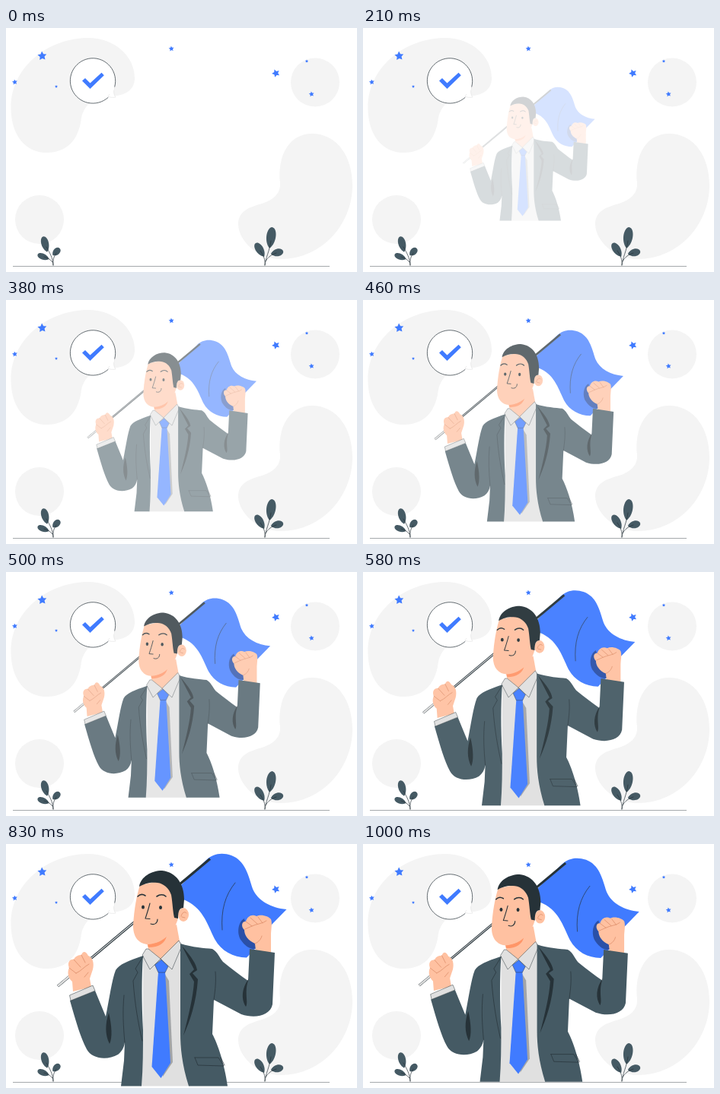
Recreate the animation shown at these times as an HTML page. Size 461x321 px, loop 1.04 s.

```html
<!DOCTYPE html>
<html lang="en">
<head>
<meta charset="utf-8">
<title>Success</title>
<style>
  html, body { margin: 0; width: 100%; height: 100%; overflow: hidden; background: #fff; }
  svg { display: block; width: 461px; height: 321px; }
  .soft { fill: #f4f4f4; }
  .blue { fill: #407bff; }
  .skin { fill: #ffc1a1; }
  .suit { fill: #455a64; }
  .dark { fill: #263238; }
  .shirt { fill: #e0e0e0; }
  .line { fill: none; stroke: #263238; stroke-width: .7; stroke-linecap: round; stroke-linejoin: round; }
  .crease { fill: none; stroke: #d98763; stroke-width: .7; stroke-linecap: round; }
  .edge { stroke: #263238; stroke-width: .5; stroke-linejoin: round; }
</style>
</head>
<body>
<svg viewBox="0 0 461 321">
  <g class="soft">
    <path d="M108 13C141 13 169 36 169 66C169 82 156 89 138 90C112 92 103 102 99 118C96 145 82 164 53 164C25 164 6.500 140 6.500 105C6.500 50 57 13 108 13Z"/>
    <path d="M402 139C434 139 455 168 455 207C455 258 415 304 361 304C328 304 305 278 305 258C305 240 322 235 336 231C352 226 361 217 360 204C356 168 372 139 402 139Z"/>
    <circle cx="406" cy="71.500" r="32"/>
    <circle cx="44" cy="252" r="32"/>
  </g>
  <path d="M9 313.500H425" stroke="#a5a9ab" stroke-width="1"/>
  <g id="stars" class="blue"></g>
  <g id="leaves" class="suit"></g>
  <path class="line" d="M62 312C62 303 57 295 53 288M62 312C61 305 63 301 66 296M61 308C58 304 54 302 50 301M340 312C341 302 346 294 348 280M340 312C341 305 338 299 334 293M341 307C344 301 349 298 355 296"/>

  <circle cx="114" cy="69.500" r="29.700" fill="#fff"/>
  <path d="M143 77C141 82 141 87 144 91C140 92 136 91 134 90Z" fill="#fff" stroke="#d5d5d5" stroke-width=".4"/>
  <path d="M132 85L141 70L142 80L139 88Z" fill="#fff"/>
  <path class="line" d="M134 91.500A29.700 29.700 0 1 1 142.800 77"/>
  <path class="blue" d="M100 69.500L104 66L110.500 72.500L125.500 58.700L128.800 62.300L110.500 80Z"/>

  <g id="man">
    <!-- flag and pole -->
    <path class="blue" d="M229 55L262 22C272 12 284 11 296 15C314 22 318 40 324 59C331 75 348 84 368.500 86L349 106L325 140L316 149.500C298 149 283 141 274 125C264 104 258 83 233 73Z"/>
    <path class="line" d="M301 51C288 67 282 87 284 113"/>
    <path d="M313 98C304 103 303 119 309 127C314 134 320 139 329 138L327 121L316 112Z" fill="#2a50a8"/>
    <path d="M68 187L268 19.500" stroke="#263238" stroke-width="3.200"/>
    <path d="M68.500 186.500L170 101.500" stroke="#cfd2d4" stroke-width="1.100"/>
    <path d="M68 187L88 170" stroke="#e0e0e0" stroke-width="2.400"/>

    <!-- raised fist -->
    <path class="skin" d="M328 140L327 131C318 127 313 120 313 113C308 108 310 101 315 102C317 95 323 92 329 95C335 92 345 95 348 99C350 104 348 113 348 120L348 144Z"/>
    <path class="crease" d="M315 102L323 108M321 97L330 105M331 96L337 104M314 112L323 108C329 105 337 105 342 101M327 131C332 129 335 125 336 121"/>

    <!-- neck and shirt -->
    <path class="shirt" d="M180 145L230 129L236 265L242 318.500H176L180 250Z"/>
    <path class="skin" d="M184 126L224 106L228 128L204 152L187 138Z"/>
    <path d="M186 131C198 131 206 127 211 121C209 130 201 136 187 136Z" fill="#ff9668"/>
    <path class="shirt edge" d="M184 138L179 146L189 165L203 151L187 138ZM227 127L231 134L218 165L203 151Z"/>

    <!-- tie -->
    <path d="M208 170L214 180L219 287L206 306Z" fill="#a3a5a7"/>
    <path class="blue" d="M200 168H209L216 288L203.500 308L191.500 293Z"/>
    <path class="blue edge" d="M204 152L195.500 159L200 169H209L213 161Z"/>

    <!-- jacket -->
    <path class="suit" d="M180 147C160 154 149 158 144 166C139 179 136 202 131 227L117 193L84 206C92 234 98 255 106 270C113 283 133 285 147 277C152 273 155 268 156 261L155 285L151 318.500H178C180 294 180 270 180 245C178 210 178 175 180 147Z"/>
    <path class="suit" d="M229 131C245 136 261 137 271 138C278 142 280 149 285 155C296 164 308 173 318 180L320 138L353 143L350 211C347 226 327 230 309 224L273 205L271 250C278 263 287 289 291 318.500H240C231 290 229 267 229 249Z"/>
    <path class="dark" d="M135 222C130 237 130 251 136 263C140 255 139 239 135 222ZM319 177C309 190 309 205 315 214C319 209 312 194 319 177Z"/>
    <path class="dark" d="M231 134C244 149 250 158 251 166L245 170L252 178C250 208 242 232 233 252C240 225 246 200 247 181L241 171L247 165Z"/>
    <path class="line" d="M180 148L170 164L173 169L167 180C169 210 174 238 179 259M156 261C154 239 153 220 155 199M273 205C275 190 276 181 275 168M248 281H279L286 292L252 291L248 281M282 281L287 291"/>

    <!-- hand on the pole -->
    <path class="skin" d="M88 194L87 181C80 175 81 166 83 163C80 156 84 151 89 152C91 147 96 146 99 146C101 140 105 141 108 147C114 149 116 157 114 165L110 177L112 188Z"/>
    <path class="crease" d="M83 163L92 170M89 152L98 162M99 146L104 156M92 170C99 167 103 161 109 158M103 175L108 169"/>
    <path class="shirt edge" d="M83.500 199L114 186L117 193L85 206Z"/>

    <!-- head -->
    <ellipse class="skin" cx="233" cy="93" rx="7" ry="9"/>
    <path class="crease" d="M230 95C231 90 235 88 237 91M231 96L235 97"/>
    <path class="skin" d="M176 54C172 66 168 86 167 108C167 123 175 132 187 132C203 131 220 119 226 98L226 65L206 48Z"/>
    <path class="dark" d="M175 56C177 43 191 35 205 35C224 37 234 53 234 73L233 84C228 84 226 88 226 98L221 97C219 88 219 79 217 67C214 58 207 52 199 51C190 50 184 51 175 56Z"/>
    <path class="line" style="stroke-width:1.600" d="M173 69C176 66 180 66 183 68M198 69C202 66 207 66 210 69"/>
    <ellipse class="dark" cx="180" cy="83" rx="2" ry="2.600"/>
    <ellipse class="dark" cx="203" cy="83.500" rx="2" ry="2.600"/>
    <path class="line" style="stroke-width:1.100" d="M189 78C187 86 185 92 183 98L189 98.500M190 105C195 107 199 104 199 99"/>
  </g>
</svg>
<script>
  const LOOP = 1040, FPS = 24, PEAK = 1.05;
  const CENTER = [218, 165.5];
  const man = document.getElementById('man');

  function add(parent, tag, attrs) {
    const node = document.createElementNS('http://www.w3.org/2000/svg', tag);
    for (const key in attrs) node.setAttribute(key, attrs[key]);
    document.getElementById(parent).append(node);
  }

  function star(x, y, r, turn) {
    const points = Array.from({ length: 10 }, (_, i) => {
      const a = (i * 36 - 90 + turn) * Math.PI / 180, d = i % 2 ? r * .5 : r;
      return [x + d * Math.cos(a), y + d * Math.sin(a)].map(v => v.toFixed(2)).join();
    });
    add('stars', 'polygon', { points: points.join(' ') });
  }

  // A leaf is two curves meeting in soft points, rotated around its middle.
  function leaf(x, y, w, h, turn) {
    add('leaves', 'path', {
      d: `M0 ${-h}C${w * 1.1} ${-h} ${w * 1.5} ${h * .35} 0 ${h}C${-w * 1.5} ${h * .35} ${-w * 1.1} ${-h} 0 ${-h}Z`,
      transform: `translate(${x} ${y}) rotate(${turn})`
    });
  }

  [[47.5, 36.8, 6.2, -4], [11.5, 71.2, 3.6, -8], [66, 77, 2.1, 0], [217.2, 27.3, 3.6, -6],
   [354.5, 59.5, 5.4, -22], [395, 43.7, 2.2, 0], [401.3, 87, 3.6, -8]].forEach(s => star(...s));
  [[51.5, 284.5, 5, 10.5, -14], [66, 294.5, 4.4, 6.5, 45], [49, 301, 4, 8, -68],
   [348, 276, 6.2, 14, 8], [333.5, 292, 5.2, 10.5, -32], [356, 295.5, 5, 8.3, 78]].forEach(l => leaf(...l));

  // Piecewise linear value at x through [x, value] pairs.
  function track(keys, x) {
    const i = keys.findIndex(k => k[0] > x);
    if (i < 0) return keys[keys.length - 1][1];
    if (!i) return keys[0][1];
    const [x0, v0] = keys[i - 1], [x1, v1] = keys[i];
    return v0 + (v1 - v0) * (x - x0) / (x1 - x0);
  }

  const appear = [[2.5, 0], [5, .208], [9, .549], [11, .729], [14, .944], [15, 1]];
  const pulse = [[15, 1], [20, PEAK], [25, 1]];

  function render(ms) {
    const tick = Math.floor((Math.floor(ms % LOOP / 10) + .49) * FPS / 100);
    const shown = track(appear, tick);
    const scale = (.5 + .5 * shown) * track(pulse, tick) / PEAK;
    const [x, y] = CENTER;
    man.setAttribute('opacity', shown);
    man.setAttribute('transform', `translate(${x} ${y}) scale(${scale}) translate(${-x} ${-y})`);
  }

  const start = performance.now();
  function loop() {
    render(performance.now() - start);
    requestAnimationFrame(loop);
  }
  loop();
</script>
</body>
</html>
```
